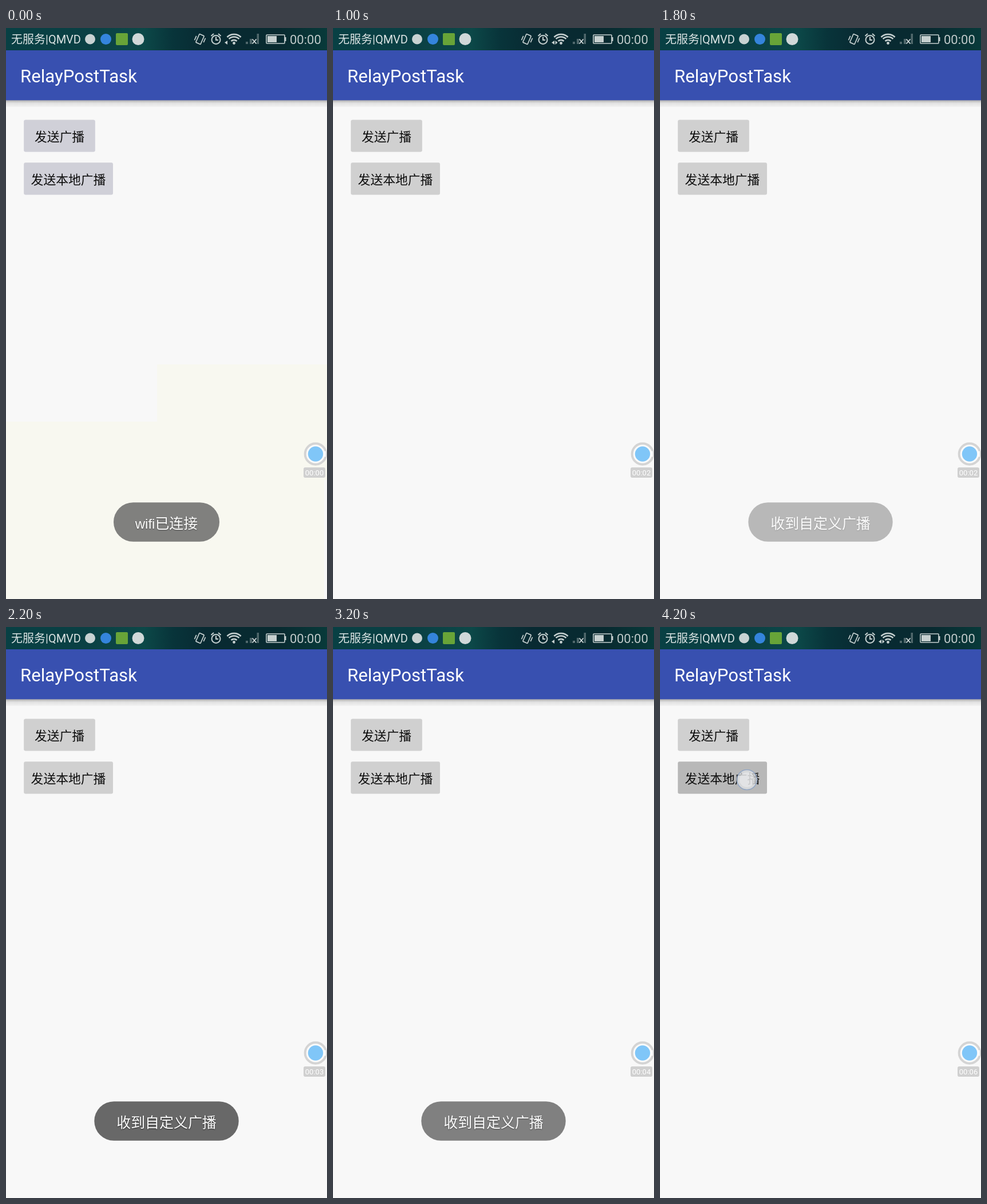
Animation of 561 by 998 pixels, one loop 4.4 s. Source, as an HTML page:

```html
<!DOCTYPE html>
<html lang="zh">
<head>
<meta charset="utf-8">
<title>Toast demo</title>
<style>
  html, body { margin: 0; width: 100%; height: 100%; overflow: hidden; background: #f8f8f8; }
  svg { display: block; width: 100%; height: 100%; }
  text { font-family: Roboto, "Noto Sans CJK SC", "Noto Sans CJK", sans-serif; }
  .mid { text-anchor: middle; }
  .btn { font-size: 21.8px; fill: #0c0c0c; }
  .toast text { font-size: 24.93px; fill: #fff; text-shadow: 0 1px 2px rgba(0, 0, 0, .6); }
  .toast rect { fill: #686868; }
  .latin { font-family: "Liberation Sans", sans-serif; font-size: 24px; }
  .line { fill: none; stroke: #c6d0d0; stroke-width: 2; }
</style>
</head>
<body>
<svg viewBox="0 0 561 998" preserveAspectRatio="none">
  <defs>
    <linearGradient id="bar">
      <stop offset="0" stop-color="#084044"/>
      <stop offset=".25" stop-color="#0a4044"/>
      <stop offset=".43" stop-color="#0c4848"/>
      <stop offset=".52" stop-color="#08343a"/>
      <stop offset=".62" stop-color="#082a32"/>
      <stop offset=".85" stop-color="#082a30"/>
      <stop offset="1" stop-color="#083a3a"/>
    </linearGradient>
    <linearGradient id="shade" x2="0" y2="1">
      <stop offset="0" stop-color="#a0a0a8"/>
      <stop offset=".2" stop-color="#c6c6c6"/>
      <stop offset=".45" stop-color="#e2e2e2"/>
      <stop offset="1" stop-color="#f2f2f2"/>
    </linearGradient>
  </defs>

  <rect width="561" height="998" fill="#f8f8f8"/>
  <path id="tint" d="M264 588H561V790H556V998H0V688H264Z" fill="#f8f8f0"/>

  <!-- status bar -->
  <rect width="561" height="39" fill="url(#bar)"/>
  <text x="9" y="27" font-size="20" fill="#dce4e4">无服务|QMVD</text>
  <circle cx="147" cy="19.5" r="9" fill="#c8d2d2"/>
  <circle cx="174.5" cy="19.5" r="9.5" fill="#3484dc"/>
  <rect x="192" y="9" width="21" height="21" rx="2" fill="#68a438"/>
  <circle cx="231" cy="19.5" r="10.5" fill="#d0d8d8"/>
  <g class="line">
    <g transform="rotate(24 339 19.5)" stroke-width="1.7">
      <rect x="334.5" y="11.5" width="9" height="16" rx="1"/>
      <path d="M331 17V25M347 14V22"/>
    </g>
    <circle cx="367" cy="20.5" r="7.5"/>
    <path d="M367 15.5V21H371M358.5 14L363 10M375.5 14L371 10"/>
    <g id="waves" stroke-width="2.7"></g>
    <rect x="455" y="12" width="32" height="15" rx="1" stroke-width="1.6"/>
  </g>
  <g fill="#c6d0d0">
    <circle cx="398.5" cy="26.5" r="2.4"/>
    <path id="left" d="M387 22V29L382 25.5Z"/>
    <path id="right" d="M388.5 22V29L392.5 25.5Z"/>
    <rect x="457" y="14" width="16" height="11"/>
    <rect x="487" y="16" width="2.5" height="7"/>
  </g>
  <path d="M419 24h4v4h-4zM426 19h4v9h-4zM438.5 10h3.5v18h-3.5z" fill="#50686c"/>
  <path d="M430.5 19.5l7 8m0-8l-7 8" stroke="#d4dcdc" stroke-width="1.8"/>
  <text x="496" y="28" font-size="22" fill="#c0caca">00:00</text>

  <!-- title bar -->
  <rect y="126" width="561" height="12" fill="url(#shade)"/>
  <rect y="39" width="561" height="87.2" fill="#3850b0"/>
  <text x="25" y="95" font-size="31.16" fill="#fff">RelayPostTask</text>

  <!-- buttons -->
  <rect id="btn1" x="31.2" y="160.5" width="124.6" height="56.1" rx="3"/>
  <text class="btn mid" x="93.5" y="198">发送广播</text>
  <rect id="btn2" x="31.2" y="235.3" width="155.8" height="56.1" rx="3"/>
  <text class="btn mid" x="109" y="273">发送本地广播</text>
  <g id="touch">
    <circle r="18.5" fill="#c4ccd8" fill-opacity=".45"/>
    <circle r="17.5" fill="#f0f0f0" fill-opacity=".5" stroke="#8098bc" stroke-opacity=".75" stroke-width="1.5"/>
    <circle r="13" fill="#f4f4f4" fill-opacity=".4"/>
  </g>

  <!-- recorder bubble -->
  <circle cx="541" cy="744.5" r="18.3" fill="#fafafa" stroke="#d4d4d4" stroke-width="4"/>
  <rect x="555" y="739.5" width="4" height="10" fill="#fafafa"/>
  <circle cx="541" cy="744.5" r="13.2" fill="#80c6f8"/>
  <rect x="520" y="768" width="38" height="18" rx="3" fill="#d0d0d0"/>
  <text id="clock" class="mid" x="539" y="782" font-size="13" fill="#fff"></text>

  <g id="wifi" class="toast">
    <rect x="188" y="829.2" width="185" height="68.6" rx="34.3"/>
    <text class="mid" x="280.5" y="874.5"><tspan class="latin">wifi</tspan>已连接</text>
  </g>
  <g id="custom" class="toast">
    <rect x="154.3" y="829.2" width="252.4" height="68.6" rx="34.3"/>
    <text class="mid" x="280.5" y="874.5">收到自定义广播</text>
  </g>
</svg>
<script>
const LOOP = 4400;
const $ = id => document.getElementById(id);

// Each track lists [start ms, value]; a value holds until the next start.
const tracks = {
  tint:    [[0, 1], [200, 0]],
  face:    [[0, "#d0d0d8"], [800, "#d0d0d0"]],
  seconds: [[0, 0], [800, 1], [1000, 2], [2000, 3], [2800, 4], [3400, 5], [4000, 6]],
  wifi:    [[0, .83], [200, .4], [400, 0]],
  custom:  [[0, 0], [1800, .44], [2000, .9], [2200, 1], [3200, .83], [3400, .4], [3600, 0]],
  pressed: [[0, 0], [1400, 1], [1800, 0], [4200, 2]],
  touch:   [[0, null], [1400, [62, 181]], [1600, null], [4200, [152, 267]]],
  left:    [[0, 1], [1600, 0], [2600, 1], [3400, 0], [4200, 1]],
  right:   [[0, 0], [600, 1], [1600, 0], [2600, 1], [3200, 0], [4200, 1]]
};

function at(name, t) {
  let value;
  for (const [start, v] of tracks[name]) if (t >= start) value = v;
  return value;
}

$("waves").innerHTML = [7, 12.5, 17].map(r => {
  const d = r * Math.SQRT1_2;
  return `<path d="M${398.5 - d} ${28 - d}A${r} ${r} 0 0 1 ${398.5 + d} ${28 - d}"/>`;
}).join("");

function draw(t) {
  for (const id of ["tint", "wifi", "custom", "left", "right"])
    $(id).setAttribute("opacity", at(id, t));
  for (const n of [1, 2])
    $("btn" + n).setAttribute("fill", at("pressed", t) === n ? "#b8b8b8" : at("face", t));
  const spot = at("touch", t);
  $("touch").setAttribute("opacity", spot ? 1 : 0);
  if (spot) $("touch").setAttribute("transform", `translate(${spot})`);
  $("clock").textContent = "00:0" + at("seconds", t);
}

const begin = performance.now();
function tick() {
  draw((performance.now() - begin) % LOOP);
  requestAnimationFrame(tick);
}
tick();
</script>
</body>
</html>
```
